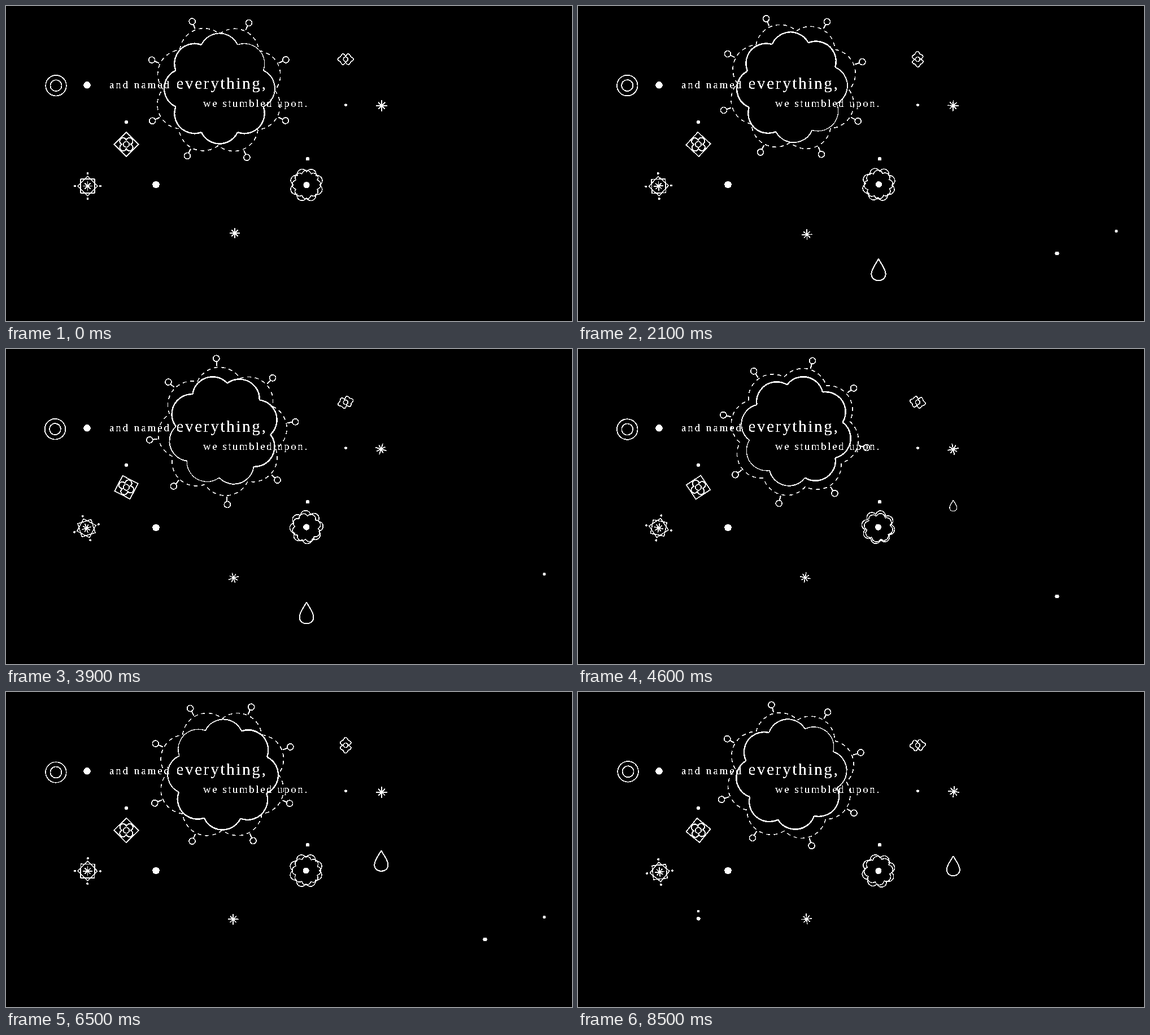
An HTML page with a canvas that plays this animation: 1002 by 559 pixels, repeating every 8.6 s.

```html
<!DOCTYPE html>
<html lang="en">
<head>
<meta charset="utf-8">
<title>Everything we stumbled upon</title>
<style>
  html, body { margin: 0; width: 100%; height: 100%; overflow: hidden; background: #000; }
  canvas { display: block; }
</style>
</head>
<body>
<canvas id="stage" width="1002" height="559"></canvas>
<script>
const canvas = document.getElementById('stage');
const ctx = canvas.getContext('2d', { willReadFrequently: true });
const W = 1002, H = 559, TAU = Math.PI * 2, RAD = Math.PI / 180;
const LOOP = 8600, STEP = 100;
const SPIN = 0.04165 * RAD; // per millisecond

// Drifting centres of the large flower: time, x, y
const INNER_PATH = [
  [0, 378, 146.5], [1300, 379, 144.5], [2800, 379, 144], [3900, 384.5, 144.5],
  [5300, 387.5, 147.5], [6500, 384, 146.5], [8500, 378, 146], [8600, 378, 146.5]
];
const OUTER_PATH = [
  [0, 376.9, 148.6], [1300, 382.4, 146.8], [2800, 380, 140.3], [3900, 383.3, 146.3],
  [5300, 384.4, 147.8], [6500, 382.8, 146.1], [8500, 376.9, 148.1], [8600, 376.9, 148.6]
];
// The pins are set by hand, a few degrees off an even spacing
const PIN_LEAN = [1.7, -0.6, 2.3, -3.3, 0.8, 0.5, 0.9, -2.4];

const mod = (a, b) => ((a % b) + b) % b;

function along(path, t) {
  let i = 0;
  while (i < path.length - 2 && path[i + 1][0] <= t) i++;
  const [t0, x0, y0] = path[i], [t1, x1, y1] = path[i + 1];
  const k = (1 - Math.cos(Math.PI * (t - t0) / (t1 - t0))) / 2;
  return [x0 + (x1 - x0) * k, y0 + (y1 - y0) * k];
}

function dot(x, y, r) {
  ctx.beginPath();
  ctx.arc(x, y, r, 0, TAU);
  ctx.fill();
}

function ring(x, y, r, width = 1.6) {
  ctx.lineWidth = width;
  ctx.beginPath();
  ctx.arc(x, y, r, 0, TAU);
  ctx.stroke();
}

function line(x0, y0, x1, y1, width) {
  ctx.lineWidth = width;
  ctx.beginPath();
  ctx.moveTo(x0, y0);
  ctx.lineTo(x1, y1);
  ctx.stroke();
}

// Closed chain of n outward arcs; widthAt gives the line width for a direction
function lobes(n, cusp, peak, start, widthAt) {
  const step = TAU / n;
  const half = cusp * Math.sin(step / 2), base = cusp * Math.cos(step / 2);
  const rise = peak - base;
  const r = (half * half + rise * rise) / (2 * rise);
  const dist = peak - r, sweep = Math.atan2(half, base - dist);
  for (let i = 0; i < n; i++) {
    const mid = start + (i + 0.5) * step;
    ctx.lineWidth = widthAt(mid);
    ctx.beginPath();
    ctx.arc(Math.cos(mid) * dist, Math.sin(mid) * dist, r, mid - sweep, mid + sweep);
    ctx.stroke();
  }
}

// Draws in a frame that turns about (x, y), with a small off-pivot offset
function turning(x, y, angle, draw, dx = 0, dy = 0) {
  ctx.save();
  ctx.translate(x, y);
  ctx.rotate(angle);
  ctx.translate(dx, dy);
  draw();
  ctx.restore();
}

function square(half, width = 1.4) {
  ctx.lineWidth = width;
  ctx.strokeRect(-half, -half, half * 2, half * 2);
}

function asterisk(straight, diagonal, width) {
  for (let i = 0; i < 4; i++) {
    const a = i * Math.PI / 4, r = i % 2 ? diagonal : straight;
    const x = Math.cos(a) * r, y = Math.sin(a) * r;
    line(-x, -y, x, y, width);
  }
}

function bigFlower(t, spin) {
  const thinning = a => Math.max(0, Math.cos(a - spin + 45 * RAD)) ** 2;
  turning(...along(INNER_PATH, t), spin - spin, () =>
    lobes(8, 84, 98, 22.5 * RAD + spin, a => 2.3 - 1.1 * thinning(a)));

  turning(...along(OUTER_PATH, t), 23.2 * RAD - spin, () => {
    ctx.setLineDash([7, 6.2]);
    lobes(8, 99, 114, 22.5 * RAD, () => 1.5);
    ctx.setLineDash([]);
    PIN_LEAN.forEach((lean, i) => turning(0, 0, (i * 45 + lean) * RAD, () => {
      line(116, 0, 124.5, 0, 2);
      ring(130, 0, 5.5);
    }));
  });
}

function smallFlower(spin) {
  turning(531.8, 316.8, -spin, () => {
    lobes(8, 23, 29.5, 45.7 * RAD, () => 1.5);
    dot(0, 0, 5.5);
  }, 0.2, 0.7);
  turning(532, 317, spin, () => lobes(8, 20.5, 25.5, 22.5 * RAD, () => 1.5));
}

function tile() {
  square(15.3, 1.7);
  lobes(4, 7, 14, 45 * RAD, () => 1.9);
  ring(0, 0, 5.2, 1.7);
}

function octagram() {
  square(12.3);
  for (let i = 0; i < 4; i++) {
    dot(22.5, 0, 2);
    ctx.rotate(Math.PI / 2);
  }
  turning(0, 0, Math.PI / 4, () => square(12.3));
  asterisk(8.5, 7.5, 1.6);
}

function cloud() {
  ctx.lineWidth = 1.6;
  ctx.beginPath();
  ctx.moveTo(-9, 4.5);
  ctx.quadraticCurveTo(-19, 0, -9, -4.5);
  ctx.quadraticCurveTo(-5, -14.5, 0, -5);
  ctx.quadraticCurveTo(5, -14.5, 9, -4.5);
  ctx.quadraticCurveTo(19, 0, 9, 4.5);
  ctx.quadraticCurveTo(5, 14.5, 0, 5);
  ctx.quadraticCurveTo(-5, 14.5, -9, 4.5);
  ctx.closePath();
  ctx.stroke();
  ring(0, 0, 4, 1.6);
}

// Quick growth to 1 at peak, slow fall to 0 at life
function swell(age, peak, life) {
  if (age >= life) return 0;
  if (age < peak) return Math.sqrt(age / peak);
  return 1 - ((age - peak) / (life - peak)) ** 2;
}

function drop(x, y, age) {
  const size = swell(age, 190, 720);
  if (!size) return;
  const h = 41 * size;
  const fall = 37 * (1 - Math.exp((30 - age) / 100));
  ctx.save();
  ctx.translate(x, y + fall);
  ctx.scale(h, h);
  ctx.lineWidth = Math.max(1.1, 2 * size) / h;
  ctx.beginPath();
  ctx.moveTo(0, -0.5);
  ctx.bezierCurveTo(0.08, -0.32, 0.32, -0.05, 0.32, 0.18);
  ctx.bezierCurveTo(0.32, 0.36, 0.18, 0.48, 0, 0.48);
  ctx.bezierCurveTo(-0.18, 0.48, -0.32, 0.36, -0.32, 0.18);
  ctx.bezierCurveTo(-0.32, -0.05, -0.08, -0.32, 0, -0.5);
  ctx.stroke();
  ctx.restore();
}

function fallingDots(age) {
  const size = swell(age, 350, 1050);
  if (!size) return;
  const fall = 1 - Math.exp(-age / 400);
  dot(213, 378 + 13 * fall, 3.1 * size);
  dot(213.3, 383.3 + 23 * fall, 4.4 * size);
}

function blink(t, from, to, x, y, r) {
  const phase = t % 1500;
  if (phase >= from && phase < to) dot(x, y, r);
}

function words(text, x, y, size, spacing) {
  ctx.font = `${size}px "Liberation Serif", "Times New Roman", serif`;
  ctx.letterSpacing = spacing + 'px';
  ctx.fillText(text, x, y);
}

// Pure black and white, with hard edges
function harden() {
  const image = ctx.getImageData(0, 0, W, H), px = image.data;
  for (let i = 0; i < px.length; i += 4) {
    px[i] = px[i + 1] = px[i + 2] = px[i] > 110 ? 255 : 0;
  }
  ctx.putImageData(image, 0, 0);
}

function draw(t) {
  const spin = t * SPIN;
  ctx.fillStyle = '#000';
  ctx.fillRect(0, 0, W, H);
  ctx.fillStyle = ctx.strokeStyle = '#fff';

  bigFlower(t, spin);
  smallFlower(spin);
  turning(87.8, 141.8, -spin, () => {
    ring(0, 0, 18.3);
    ring(0, 0, 10);
  }, 0.7, -0.6);
  turning(213, 245.5, spin + 45 * RAD, tile);
  turning(143.6, 318.6, spin, octagram, 0.9, 0.9);
  turning(601.3, 94.5, spin, cloud);
  turning(664.6, 177.3, -spin, () => asterisk(10, 8.5, 1.7), 0.5, -0.5);
  turning(403.7, 404.5, spin, () => asterisk(9.5, 8, 1.5), 1.3, -1.5);

  dot(143.5, 140.3, 6.2);
  dot(213, 206, 3);
  dot(265.5, 317, 6.2);
  dot(534, 271.2, 3.3);
  dot(601.5, 176, 2.4);
  blink(t, 150, 950, 953, 399.5, 2.5);
  blink(t, 100, 850, 848, 439, 3.6);

  drop(664.3, 273, mod(t - 985, 1785));
  drop(532, 434, mod(t - 25, 1785));
  fallingDots(mod(t - 150, 2550));

  words('and named', 183, 146, 19, 2.9);
  words('everything,', 301.5, 147, 29, 2.7);
  words('we stumbled upon.', 349, 179, 19, 2.5);
  harden();
}

let shown = -1;
function tick() {
  const step = Math.floor((performance.now() % LOOP) / STEP);
  if (step !== shown) {
    shown = step;
    draw(step * STEP);
  }
  requestAnimationFrame(tick);
}
tick();
</script>
</body>
</html>
```
